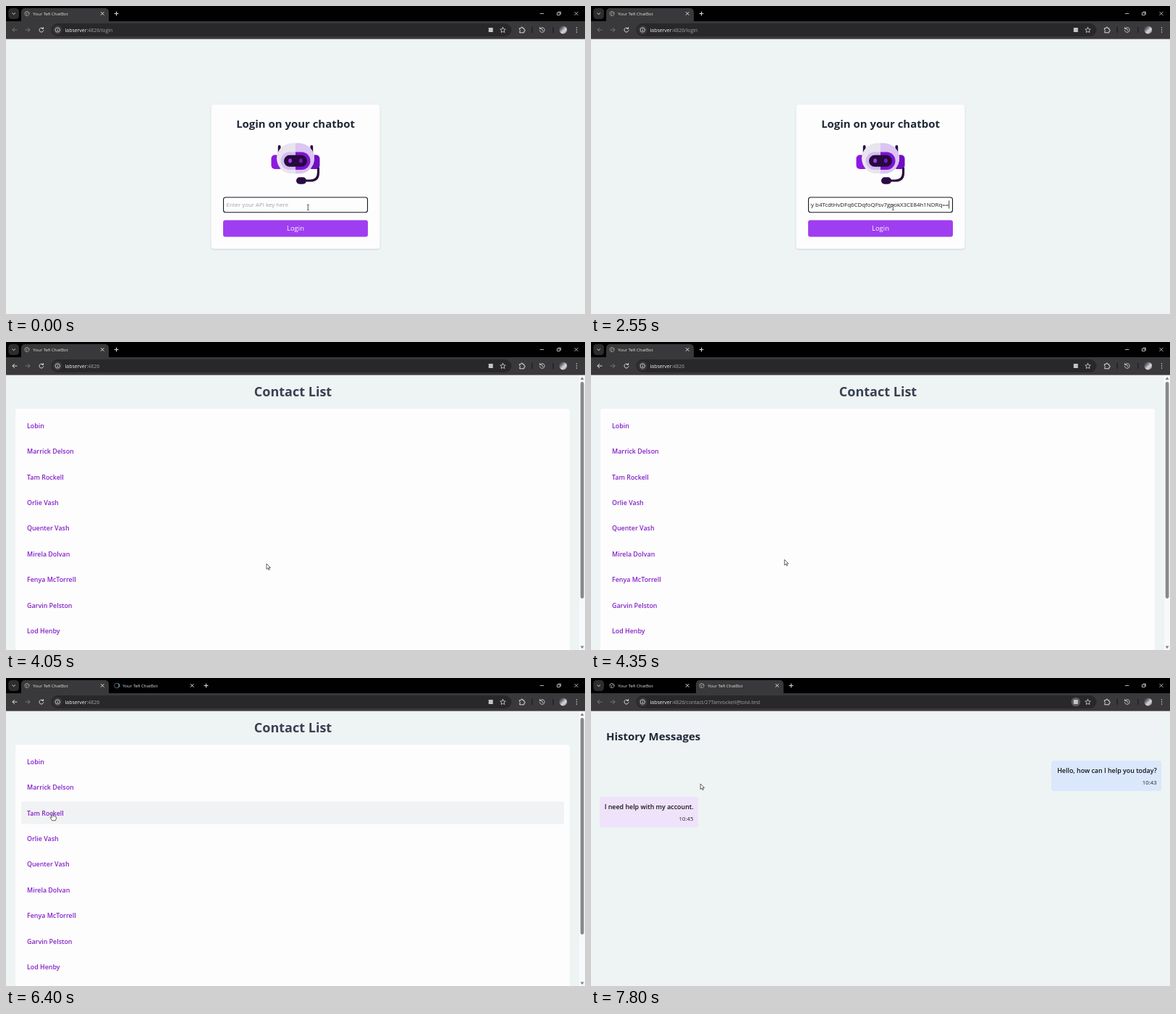
These frames come from a looping animation (800 px wide and 425 px high, 8000 ms). An HTML page:

```html
<!DOCTYPE html>
<html lang="en">
<head>
<meta charset="utf-8">
<title>Chatbot demo</title>
<style>
html, body { margin: 0; height: 100%; overflow: hidden; background: #eef3f4; }
svg { display: block; width: 100vw; height: 100vh; font-family: "Open Sans", "Noto Sans", sans-serif; }
.h { font-weight: 700; fill: #1f2937; }
.c { text-anchor: middle; }
.e { text-anchor: end; }
.icon { fill: none; stroke: #dedede; stroke-width: 1; stroke-linecap: round; stroke-linejoin: round; }
.thin { stroke-width: .8; }
.tab { font-size: 6px; fill: #e6e6e6; }
.msg { font-size: 8.9px; font-weight: 600; fill: #101318; }
.time { font-size: 7.8px; fill: #20242a; }
.card { fill: #fdfdfd; filter: drop-shadow(0 1px 1.2px #0002); }
.soft { filter: drop-shadow(0 .6px .7px #0002); }
</style>
</head>
<body>
<svg viewBox="0 0 800 425" preserveAspectRatio="none">
  <defs>
    <g id="tabBody">
      <text class="tab" x="37.3" y="12.8">Your Tefi ChatBot</text>
      <path class="icon" d="M131.2 8.4l4 4m0-4l-4 4"/>
    </g>
    <g id="globe" class="icon thin" style="stroke:#9a9a9a">
      <circle cx="29" cy="10.5" r="3.2"/>
      <path d="M26.2 9.5l2.4 1v2.6M28.5 7.6l.8 1.6 2.6 .6"/>
    </g>
    <clipPath id="field"><rect x="303.5" y="265" width="192.5" height="19"/></clipPath>
    <clipPath id="slide"><rect id="slideBox" x="145" y="0" width="0" height="24"/></clipPath>
    <clipPath id="right"><rect x="400" y="185" width="40" height="50"/></clipPath>
    <linearGradient id="photo" x2="1" y2="1">
      <stop offset=".25" stop-color="#565b60"/><stop offset=".6" stop-color="#d8dadc"/><stop offset="1" stop-color="#777"/>
    </linearGradient>
  </defs>

  <g id="login">
    <rect class="card" x="283.5" y="136" width="233" height="199" rx="4"/>
    <text class="h c" x="400" y="168.4" font-size="14.95">Login on your chatbot</text>

    <g fill="#2a0c43">
      <rect x="375.8" y="192" width="3.8" height="18" rx="1.9"/>
      <rect x="420.4" y="192" width="3.8" height="18" rx="1.9"/>
    </g>
    <rect x="366.5" y="205.5" width="16" height="19.5" rx="5" fill="#8c19e2"/>
    <rect x="417.5" y="205.5" width="16" height="19.5" rx="5" fill="#6f10c2"/>
    <path d="M431.5 223v7q0 11-11 11h-9" fill="none" stroke="#2a0c43" stroke-width="3.2"/>
    <rect x="401" y="236.3" width="14" height="9.4" rx="4.6" fill="#2a0c43"/>
    <g id="shell"></g>
    <rect x="384" y="205.8" width="32" height="16" rx="8" fill="#260b3d"/>
    <ellipse cx="392.6" cy="213.6" rx="2.4" ry="3" fill="#a33bf4"/>
    <ellipse cx="407.4" cy="213.6" rx="2.4" ry="3" fill="#7d16d0"/>

    <rect id="box" x="300.5" y="264" width="199" height="20.7" rx="3" fill="#fdfdfd"/>
    <g clip-path="url(#field)" font-size="7.9">
      <text id="hint" x="304.5" y="277.4" fill="#9ca3af">Enter your API key here</text>
      <text id="key" y="277.4" fill="#15181d">Key b4TcdtHvDFq6CDqfoQFsv7gpokX3CE84h1NDRq==</text>
      <path id="caret" d="M494.7 268.5v11" stroke="#111" stroke-width=".8"/>
    </g>
    <rect id="button" x="300" y="295.5" width="200" height="23" rx="3"/>
    <text class="c" x="400" y="310.4" font-size="9.4" fill="#fff">Login</text>
  </g>

  <g id="list">
    <text class="h c" x="396.5" y="75.3" font-size="18" style="fill:#374151">Contact List</text>
    <rect x="13" y="92" width="766" height="345" rx="4" fill="#fdfdfd"/>
    <rect id="row" x="21" width="750" height="31" rx="2" fill="#f1f2f4"/>
    <g id="names" font-size="8.9" font-weight="600" fill="#8320c8"></g>
    <rect x="792" y="45" width="8" height="380" fill="#f8f9fa"/>
    <rect x="793.7" y="55" width="4.8" height="299" rx="2.4" fill="#88898b"/>
    <path d="M793.6 52l2.5-3.8 2.5 3.8zM793.6 419.5l2.5 3.8 2.5-3.8z" fill="#808183"/>
  </g>

  <g id="chat">
    <rect class="soft" x="12" y="57" width="776" height="44" rx="3" fill="#eff3f5"/>
    <text class="h" x="21" y="86" font-size="15">History Messages</text>
    <rect class="soft" x="636.5" y="114" width="151.5" height="42" rx="4" fill="#dbe8fb"/>
    <text class="msg e" x="781.7" y="131.2">Hello, how can I help you today?</text>
    <text class="time e" x="781.7" y="146.8">10:43</text>
    <rect class="soft" x="12" y="164" width="136" height="42" rx="4" fill="#efe3fb"/>
    <text class="msg" x="18.7" y="181.2">I need help with my account.</text>
    <text class="time e" x="141.5" y="196.8">10:45</text>
  </g>

  <rect width="800" height="22" fill="#010101"/>
  <rect id="tabBack" x="21" y="3" width="121" height="22" rx="5" fill="#39383a"/>
  <rect y="21" width="800" height="24" fill="#39383a"/>
  <rect y="45" width="800" height="1" fill="#8f8085"/>
  <rect x="3.3" y="3" width="14.6" height="15" rx="4.5" fill="#2d2d2e"/>
  <path class="icon" d="M8.8 9.7l1.9 1.9 1.9-1.9"/>
  <use href="#tabBody"/><use href="#globe"/>
  <g clip-path="url(#slide)">
    <rect id="tabHover" x="146" y="3.5" width="119" height="15" rx="5" fill="#131314"/>
    <use href="#tabBody" x="124"/>
    <use id="globe2" href="#globe" x="124"/>
    <g id="spinner" class="icon">
      <circle cx="153" cy="10.5" r="3.4" style="stroke:#56606a"/>
      <path id="arc" d="M153 7.1a3.4 3.4 0 0 1 3.4 3.4" style="stroke:#7fb0c9"/>
    </g>
  </g>
  <path id="plus" class="icon" d="M150 10.5h5M152.5 8v5"/>
  <path class="icon thin" d="M738.2 10.5h4.6M761.8 9.2h3.4v3.4h-3.4zM763 8h3.4v3.4M785.8 8.2l4.4 4.4m0-4.4l-4.4 4.4"/>

  <path id="back" class="icon" d="M15 33H9m2.7-2.8L9 33l2.7 2.8"/>
  <path class="icon" d="M27 33h6m-2.7-2.8L33 33l-2.7 2.8" style="stroke:#777"/>
  <path class="icon" d="M51.2 31a3 3 0 1 0 .7 2.8M51.6 29.7v1.7h-1.8"/>
  <rect x="62.5" y="24" width="636" height="18" rx="9" fill="#282729"/>
  <circle cx="71.3" cy="33" r="6.3" fill="#39383a"/>
  <path class="icon thin" d="M71.3 32.8v2M71.3 31v.1M74.5 33a3.2 3.2 0 1 1-6.4 0a3.2 3.2 0 1 1 6.4 0"/>
  <text x="81.6" y="35.6" font-size="6.9" fill="#f2f2f2">labserver<tspan id="path" fill="#a3a3a5"></tspan></text>
  <circle id="badge" cx="669.8" cy="33" r="6.3" fill="#59595b"/>
  <rect x="666.8" y="30" width="6" height="6" fill="#c4c4c6"/>
  <path class="icon thin" d="M686.5 29.4l1.1 2.4 2.6.3-1.9 1.8.5 2.6-2.3-1.3-2.3 1.3.5-2.6-1.9-1.8 2.6-.3z"/>
  <path class="icon" d="M709.8 30.7h2v-.7a1 1 0 0 1 2 0v.7h2v2h.5a1 1 0 0 1 0 2h-.5v2.1h-6v-2a1.1 1.1 0 0 0 0-2.1z"/>
  <path d="M727 29v8M756 29v8" stroke="#171718" stroke-width="1"/>
  <path class="icon thin" d="M737.8 31.3a3.4 3.4 0 1 1-.4 2.3M737.5 29.5v2h2M740.8 31.3v2l1.4.9"/>
  <circle cx="769.8" cy="33" r="5.4" fill="url(#photo)"/>
  <path d="M788.5 30v.1M788.5 33v.1M788.5 36v.1" stroke="#dedede" stroke-width="1.4" stroke-linecap="round"/>

  <g id="cursor">
    <path id="beam" d="M-1.5-3.6q1.5 0 1.5.8v6q0 .8-1.5.8M1.5-3.6q-1.5 0-1.5.8M0 3.2q0 .8 1.5.8" fill="none" stroke="#333" stroke-width=".8"/>
    <path id="arrow" d="M0 0v7.6l1.8-1.7 1.2 2.7 1.3-.6-1.2-2.5h2.4z" fill="#fff" stroke="#222" stroke-width=".7"/>
    <path id="hand" d="M-.9.6Q0-.6.9.6v3.2q1-.6 1.5.3 1-.4 1.4.4 1.3-.3 1.3 1v2.1L4.2 10H-.6L-3.2 6q0-1.3 1.2-.8l1.1.9z" fill="#fff" stroke="#222" stroke-width=".7"/>
  </g>
</svg>
<script>
const LOOP = 8000, PASTE = 150, LIST = 3850, OPEN = 6150, CHAT = 7300;
const NAMES = ["Lobin", "Marrick Delson", "Tam Rockell", "Orlie Vash", "Quenter Vash",
  "Mirela Dolvan", "Fenya McTorrell", "Garvin Pelston", "Lod Henby"];
const STEP = 35.4, FIRST = 115.3;
const $ = id => document.getElementById(id);
const set = (id, attrs) => { for (const k in attrs) $(id).setAttribute(k, attrs[k]); };
const show = (id, on) => { $(id).style.display = on ? "" : "none"; };

const head = (shell, ring) =>
  `<rect x="374" y="189.3" width="52" height="42" rx="21" fill="${shell}"/>
   <rect x="379.5" y="201.5" width="41" height="24.5" rx="12.2" fill="${ring}"/>`;
$("shell").innerHTML = head("#e9e5ee", "#d4bcf3") +
  `<g clip-path="url(#right)">${head("#dcc4f4", "#7d14d2")}</g>`;
$("names").innerHTML = NAMES.map((n, i) =>
  `<text x="29" y="${FIRST + 3.4 + i * STEP}">${n}</text>`).join("");

// time, x, y of the pointer tip
const TRACK = [[0, 417.3, 277.7], [2700, 417.3, 277.7], [2800, 409, 316], [3100, 409, 316],
  [3300, 406.8, 308.8], [3900, 406.8, 308.8], [4350, 267.3, 300.3], [4700, 262, 298],
  [5350, 72, 202.3], [5650, 64, 187], [6400, 64, 187], [6900, 187.5, 0.3],
  [7200, 187.5, 0.3], [7300, 187, 5], [7700, 151.2, 146], [8000, 151.2, 146]];

function pointer(t) {
  const i = Math.max(1, TRACK.findIndex(k => k[0] >= t));
  const [a, b] = [TRACK[i - 1], TRACK[i]];
  const f = (t - a[0]) / (b[0] - a[0]);
  return [a[1] + (b[1] - a[1]) * f, a[2] + (b[2] - a[2]) * f];
}

function drawLogin(t) {
  const pasted = t >= PASTE, focus = t < 3100;
  show("hint", !pasted);
  show("key", pasted);
  show("caret", pasted && focus && Math.floor((t - PASTE) / 530) % 2 === 0);
  set("key", focus ? { x: 494.3, "text-anchor": "end" } : { x: 304.5, "text-anchor": "start" });
  set("box", { stroke: focus ? "#15171c" : "#dfe3e8", "stroke-width": focus ? 1.1 : .8 });
  set("button", { fill: t < 2750 ? "#9f3ef0" : "#8b18de" });
}

// The row highlight trails the pointer slightly.
function drawList(t) {
  const [, y] = pointer(t - 60);
  const i = Math.round((y - FIRST) / STEP), mid = FIRST + i * STEP;
  show("row", t > 4700 && i >= 0 && Math.abs(y - mid) < 15.5);
  set("row", { y: mid - 15.5 });
}

function drawTabs(t, y) {
  const p = Math.min(1, Math.max(0, (t - OPEN) / 200)), w = 124 * p * (2 - p);
  const chat = t >= CHAT;
  set("slideBox", { width: w });
  set("plus", { transform: `translate(${w})` });
  set("tabBack", { x: chat ? 145 : 21 });
  show("tabHover", !chat && y < 20);
  show("spinner", !chat);
  show("globe2", chat);
  set("arc", { transform: `rotate(${t * .4 % 360} 153 10.5)` });
  $("back").style.stroke = t >= LIST && !chat ? "#dedede" : "#777";
  show("badge", chat);
  $("path").textContent = ":4826" +
    (t < LIST ? "/login" : chat ? "/contact/27Tamrockell@tolvi.test" : "");
}

function draw(t) {
  const [x, y] = pointer(t);
  const beam = t < 2750, hand = !beam && t < 3900 || t >= 5550 && t < 6450;
  show("login", t < LIST);
  show("list", t >= LIST && t < CHAT);
  show("chat", t >= CHAT);
  if (t < LIST) drawLogin(t); else drawList(t);
  drawTabs(t, y);
  show("beam", beam);
  show("hand", hand);
  show("arrow", !beam && !hand);
  set("cursor", { transform: `translate(${x} ${y})` });
}

function frame() {
  draw(performance.now() % LOOP);
  requestAnimationFrame(frame);
}
frame();
</script>
</body>
</html>
```
